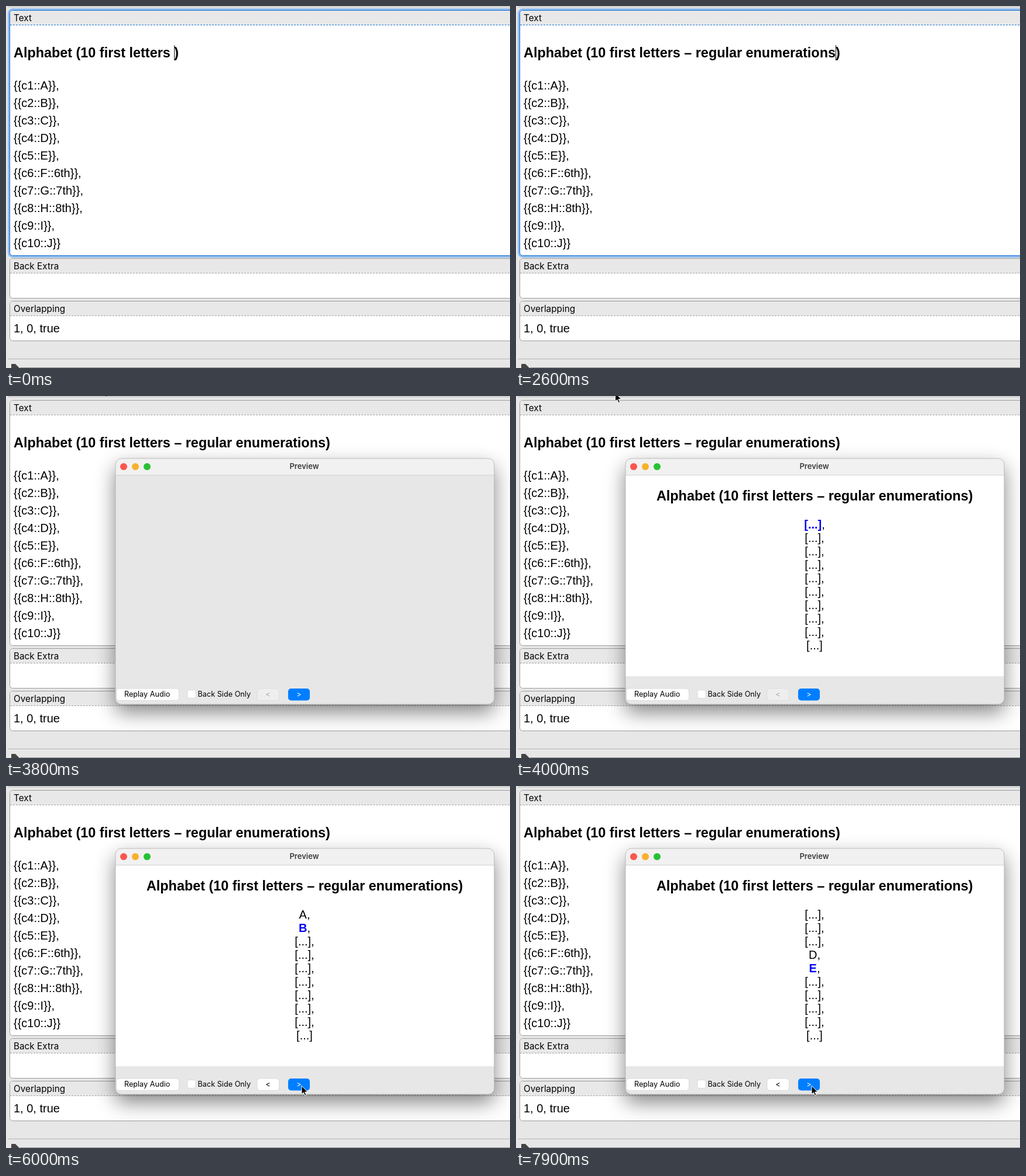
These frames come from a looping animation (861 px wide and 620 px high, 8 s). An HTML page:

```html
<!DOCTYPE html>
<html lang="en">
<head>
<meta charset="utf-8">
<title>Cloze preview</title>
<style>
  html, body { margin: 0; width: 100%; height: 100%; overflow: hidden; background: #e7e7e7; }
  svg { display: block; width: 100%; height: 100%; }
  text { font: 20px "Liberation Sans", Arial, sans-serif; white-space: pre; }
  .head { font-size: 23.4px; font-weight: bold; }
  .label { font: 15.3px Inter, sans-serif; }
  .ui { font: 12.7px Inter, sans-serif; }
  .mid { text-anchor: middle; }
  .box { fill: #fff; stroke: #9c9c9c; }
  .bar { fill: #e8e8e8; }
  .dash { stroke: #a2a2a2; stroke-dasharray: 3 2; }
  .glow { fill: none; stroke: #92bdee; stroke-width: 5; display: none; }
  .focus .glow { display: inline; }
  .focus .box { stroke: #0b69d0; }
  .focus .dash { stroke: #0f72d6; }
  .cloze { font-weight: bold; fill: #0000f0; }
  .button { fill: #fff; stroke: #d2d2d2; stroke-width: .7; }
  .off { fill: #eee; stroke: #dcdcdc; }
  .frame { filter: drop-shadow(0 14px 17px rgba(0, 0, 0, .48)); }
</style>
</head>
<body>
<svg viewBox="0 0 861 620">
  <rect width="861" height="620" fill="#e7e7e7"/>
  <path d="M3 1.5H861M3 604.5H861" stroke="#b4b4b4"/>
  <path d="M9 614q0-1 1-1h6l7 7H9z" fill="#444"/>
  <path d="M24 619.5H861" stroke="#8c8c8c"/>

  <g id="fields"></g>
  <text id="title" class="head" x="13" y="88"></text>
  <rect id="caret" y="67" width="1" height="26"/>
  <g id="source"></g>
  <text x="13" y="559">1, 0, true</text>

  <g id="win">
    <rect class="frame" x="187" y="107" width="647" height="421" rx="10" fill="#e7e7e7"/>
    <path d="M187 135V117q0-10 10-10H824q10 0 10 10V135z" fill="#f1f1f1"/>
    <path d="M187 135.5H834" stroke="#d2d2d2"/>
    <rect id="page" x="187" y="136" width="647" height="344" fill="#fff"/>
    <rect x="187" y="107" width="647" height="421" rx="10" fill="none" stroke="#b2b2b2" stroke-width=".8"/>
    <circle cx="201" cy="121" r="6" fill="#fa564f"/>
    <circle cx="221" cy="121" r="6" fill="#f8b02c"/>
    <circle cx="241" cy="121" r="6" fill="#28c135"/>
    <text class="ui mid" x="509.5" y="125" fill="#3b3b3b" style="font-size:13px;font-weight:600">Preview</text>
    <g id="card">
      <text id="cardTitle" class="head mid" x="510.3" y="179"></text>
      <g id="rows"></g>
    </g>
    <rect class="button" x="188.5" y="501" width="107" height="20.5" rx="5"/>
    <text class="ui mid" x="241.2" y="515">Replay Audio</text>
    <rect class="button" x="310" y="503.5" width="14" height="14" rx="3"/>
    <text class="ui" x="327.5" y="515">Back Side Only</text>
    <rect id="prev" class="button" x="429" y="501" width="37.5" height="20.5" rx="5"/>
    <text id="prevSign" class="ui mid" x="447.5" y="515">&lt;</text>
    <rect id="next" x="482" y="501" width="37" height="20.5" rx="5"/>
    <text class="ui mid" x="500.5" y="515" fill="#fff">&gt;</text>
  </g>

  <path id="pointer" d="M0 0V14.5L3.3 11.4 5.7 16.8 8 15.8 5.7 10.6H10.3Z" stroke="#fff"/>
</svg>
<script>
const $ = id => document.getElementById(id);
const LOOP = 8000, OPEN = 3800;
const TYPED = "– regular enumerations";
const heading = n => `Alphabet (10 first letters ${TYPED.slice(0, n)})`;
const letters = [..."ABCDEFGHIJ"];
const hints = { F: "::6th", G: "::7th", H: "::8th" };

// Question and answer sides alternate at these times
const flips = [4000, 5200, 5500, 5900, 6200, 6500, 6900, 7200, 7600, 7900];

// Pointer stops: time, x, y
const path = [[2900, 300, 187], [3600, 165, -15], [3900, 165, -15], [4500, 226, 117], [5000, 505, 513.5]];

const field = (name, top, bottom, id) => `<g id="${id}">
  <rect class="glow" x="5.5" y="${top - 1}" width="900" height="${bottom - top + 2}" rx="6"/>
  <rect class="box" x="6.5" y="${top}" width="900" height="${bottom - top}" rx="5"/>
  <path class="bar" d="M7 ${top + 25}V${top + 5}q0-4.5 4.5-4.5H861V${top + 25}z"/>
  <path class="dash" d="M7 ${top + 25}H861"/>
  <text class="label" x="13" y="${top + 18.5}">${name}</text></g>`;

$("fields").innerHTML = field("Text", 7.5, 427.5, "main")
  + field("Back Extra", 432.5, 500.5, "extra")
  + field("Overlapping", 505.5, 573.5, "overlap");

$("source").innerHTML = letters.map((c, i) =>
  `<text x="13" y="${143 + 30 * i}">{{c${i + 1}::${c}${hints[c] || ""}}}${i < 9 ? "," : ""}</text>`).join("");

$("cardTitle").textContent = heading(TYPED.length);

function typedCount(t) {
  if (t < 300) return Math.floor(t / 100);
  if (t < 1600) return 2 + Math.floor(11 * (t - 300) / 1300);
  return Math.min(TYPED.length, 13 + Math.floor(9 * (t - 1600) / 1000));
}

function rows(current, answered) {
  return letters.map((c, i) => {
    let item = i === current - 1 ? c : "[...]";
    if (i === current) item = `<tspan class="cloze">${answered ? c : "[...]"}</tspan>`;
    return `<text class="mid" x="510" y="${227 + 23 * i}">${item}${i < 9 ? "," : ""}</text>`;
  }).join("");
}

function pointerAt(t) {
  const i = path.findIndex(p => p[0] > t);
  if (i < 0) return path[path.length - 1].slice(1);
  if (i === 0) return [-50, -50];
  const [t0, x0, y0] = path[i - 1], [t1, x1, y1] = path[i];
  const u = (t - t0) / (t1 - t0), e = u * u * (3 - 2 * u);
  return [x0 + (x1 - x0) * e, y0 + (y1 - y0) * e];
}

const show = (id, on) => $(id).style.display = on ? "" : "none";

function draw(t) {
  const opened = t >= OPEN;
  $("main").setAttribute("class", opened ? "" : "focus");

  const text = heading(typedCount(t));
  $("title").textContent = text;
  $("caret").setAttribute("x", $("title").getStartPositionOfChar(text.length - 1).x);
  show("caret", !opened && !(t >= 3100 && t < 3600));

  show("win", opened);
  const step = flips.filter(f => f <= t).length - 1;
  show("page", step >= 0);
  show("card", step >= 0 && !(t >= 7200 && t < 7300));
  if (step >= 0) $("rows").innerHTML = rows(step >> 1, step % 2);

  $("prev").setAttribute("class", step > 0 ? "button" : "button off");
  $("prevSign").setAttribute("fill", step > 0 ? "#000" : "#aaa");
  const pressed = flips.some((f, i) => i && t >= f - 100 && t < f);
  $("next").setAttribute("fill", pressed ? "#006df0" : "#007eff");

  $("pointer").setAttribute("transform", `translate(${pointerAt(t)})`);
}

const start = performance.now();
function tick() {
  const t = (performance.now() - start) % LOOP;
  draw(Math.floor(t / 100) * 100);
  requestAnimationFrame(tick);
}
tick();
</script>
</body>
</html>
```
